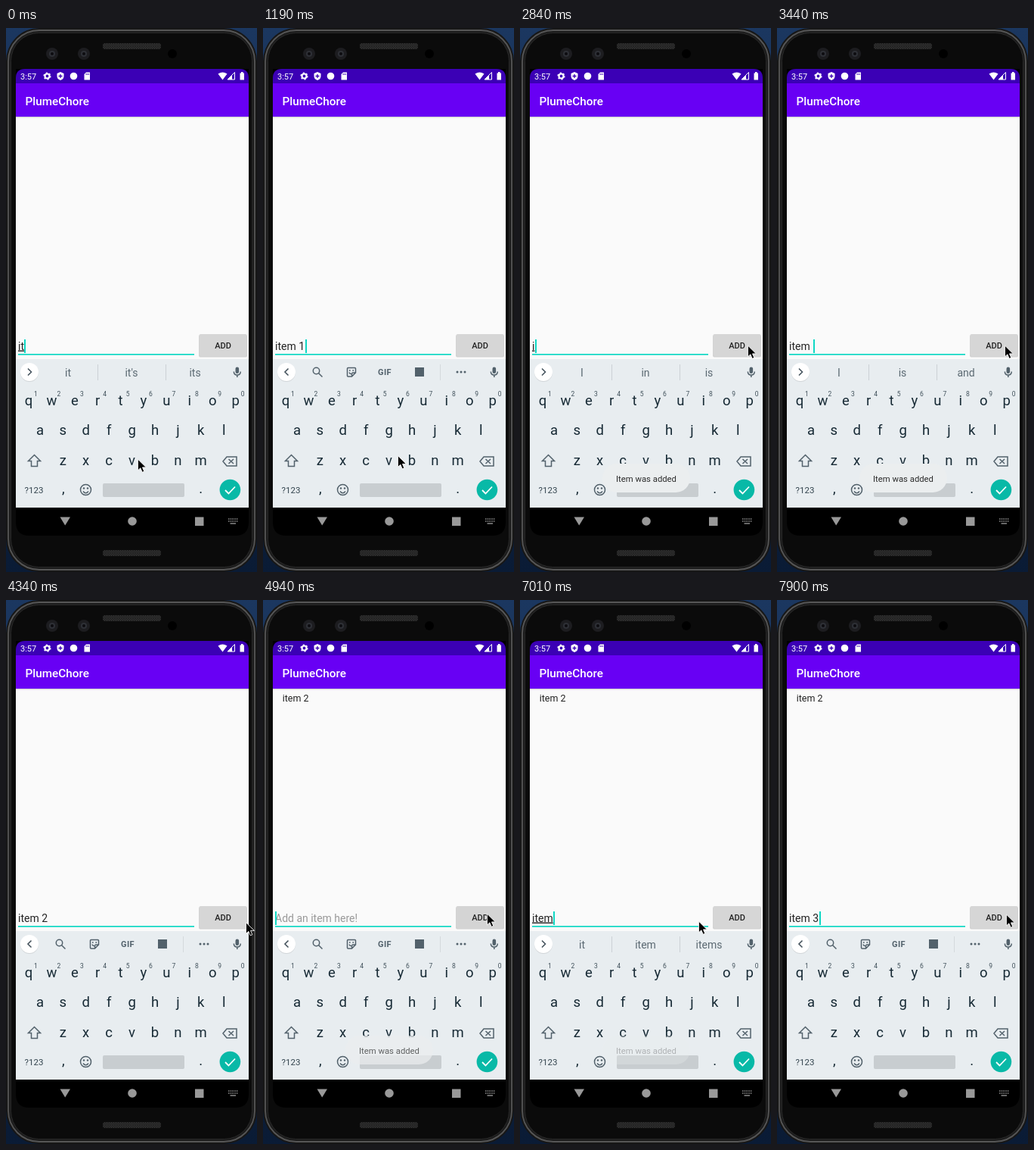
Animation, 332 px wide and 718 px high, one loop 8 s. Source, as an HTML page:

```html
<!DOCTYPE html>
<html lang="en">
<head>
<meta charset="utf-8">
<title>To-do demo</title>
<style>
  html, body { margin: 0; width: 100%; height: 100%; overflow: hidden; background: #14294a; }
  svg { display: block; width: 332px; height: 718px; font-family: Roboto, sans-serif; }
  text { white-space: pre; }
  .mid { text-anchor: middle; }
  .keys { font-size: 18.5px; fill: #172a35; }
  .nums { font-size: 8.5px; fill: #3f4f59; }
  .line { fill: none; stroke: #52616b; stroke-width: 1.5; }
  .solid { fill: #52616b; }
  .words { font-size: 14px; fill: #5b6972; }
</style>
</head>
<body>
<svg viewBox="0 0 332 718">
  <defs>
    <linearGradient id="desk" x2="0" y2="1">
      <stop offset="0" stop-color="#1b3760"/><stop offset="1" stop-color="#0a1b35"/>
    </linearGradient>
    <linearGradient id="shade" x2="0" y2="1">
      <stop offset="0" stop-opacity=".2"/><stop offset="1" stop-opacity="0"/>
    </linearGradient>
    <pattern id="mesh" width="3" height="3" patternUnits="userSpaceOnUse">
      <path d="M0 0H3V3H0Z" fill="#303030"/><path d="M0 0L3 3M3 0L0 3" stroke="#1c1c1c" stroke-width=".7"/>
    </pattern>
  </defs>

  <!-- Phone body -->
  <rect width="332" height="718" fill="url(#desk)"/>
  <rect width="332" height="718" rx="44" fill="#171717"/>
  <rect x="3" y="3" width="326" height="712" rx="41" fill="#1c1c1c" stroke="#565656" stroke-width="1.8"/>
  <rect x="6.5" y="6.5" width="319" height="705" rx="37" fill="#0b0b0b" stroke="#2a2a2a"/>
  <g fill="url(#mesh)">
    <rect x="128" y="20" width="77" height="8" rx="3"/>
    <rect x="128" y="689" width="77" height="8" rx="3"/>
  </g>
  <g fill="#1d1d20">
    <circle cx="61" cy="34" r="8"/><circle cx="103" cy="34" r="8"/>
    <g fill="#2e3036"><circle cx="61" cy="34" r="4"/><circle cx="103" cy="34" r="4"/></g>
    <g fill="#0c0c10"><circle cx="61" cy="34" r="2"/><circle cx="103" cy="34" r="2"/></g>
    <circle cx="220" cy="34" r="6" fill="#000"/>
  </g>

  <!-- Screen -->
  <path d="M13 54H321V652Q321 670 303 670H31Q13 670 13 652Z" fill="#000"/>
  <path d="M13 73V66Q13 54 25 54H309Q321 54 321 66V73Z" fill="#3b00b5"/>
  <rect x="13" y="73" width="308" height="44" fill="#6800f4"/>
  <rect x="13" y="117" width="308" height="320" fill="#fafafa"/>
  <rect x="13" y="117" width="308" height="2" fill="url(#shade)"/>
  <rect x="13" y="437" width="308" height="196" fill="#e8edf0"/>

  <g fill="#fff">
    <text x="19" y="67.5" font-size="11">3:57</text>
    <circle cx="54.5" cy="63.5" r="3" fill="none" stroke="#fff" stroke-width="2.2"/>
    <circle cx="54.5" cy="63.5" r="4.3" fill="none" stroke="#fff" stroke-width="1.6" stroke-dasharray="2 2.5"/>
    <path d="M72 58L76.5 60V63.5Q76.5 67.5 72 69Q67.5 67.5 67.5 63.5V60Z"/>
    <path d="M72 61V66M69.5 63.5H74.5" stroke="#3b00b5" stroke-width="1.3"/>
    <circle cx="89.5" cy="63.5" r="4.8"/>
    <path d="M103.5 61L106 58.5H111V68.5H103.5Z"/>
    <path d="M106 60V62M107.7 60V62M109.4 60V62" stroke="#3b00b5" stroke-width=".8"/>
    <path d="M280.5 60.5Q286.5 56.5 292.5 60.5L286.5 68.5Z"/>
    <path d="M302.5 58.5V68H293Z" fill="none" stroke="#fff"/>
    <path d="M299 62V68H293Z"/>
    <path d="M309.5 59.5H311V58H313.5V59.5H315V68.5H309.5Z"/>
    <text x="25.5" y="101.5" font-size="15.3" font-weight="500">PlumeChore</text>
  </g>

  <text id="row" x="25.7" y="134" font-size="12.5" fill="#222">item 2</text>

  <!-- Entry line -->
  <text id="hint" x="16" y="424.5" font-size="14" fill="#999">Add an item here!</text>
  <text id="entry" x="16" y="424.5" font-size="14" fill="#222"></text>
  <rect x="16" y="430" width="233" height="1.7" fill="#0fd8c4"/>
  <rect id="caret" y="411" width="2" height="18" fill="#0fd8c4"/>
  <rect x="255" y="405" width="64" height="29.5" rx="2" opacity=".16"/>
  <rect id="button" x="255.5" y="404" width="63" height="29" rx="2"/>
  <text class="mid" x="287" y="423" font-size="11" font-weight="500" fill="#222">ADD</text>

  <!-- Strip above the keys -->
  <circle cx="31" cy="455" r="12" opacity=".1"/>
  <circle cx="31" cy="454" r="12" fill="#fff"/>
  <path id="chevron" fill="none" stroke="#46545e" stroke-width="1.6"/>
  <g id="words" class="words mid">
    <path d="M121.5 444V465M211.5 444V465" stroke="#cbd1d5"/>
    <text x="82" y="459.5"></text><text x="166" y="459.5"></text><text x="250" y="459.5"></text>
  </g>
  <g id="tools">
    <g class="line">
      <circle cx="70.5" cy="452.5" r="4.2"/><path d="M73.5 455.5L78.5 460.5"/>
      <path d="M112.5 448.5H121.5Q122.5 448.5 122.5 449.5V455L117.5 460H112.5Q111.5 460 111.5 459V449.5Q111.5 448.5 112.5 448.5ZM122 455H118.5Q117.5 455 117.5 459.5M114 454.5Q115 457 117 456.5"/>
    </g>
    <g class="solid">
      <circle cx="114.8" cy="452" r=".9"/><circle cx="119.2" cy="452" r=".9"/>
      <text class="mid" x="161" y="458" font-size="11" font-weight="700" letter-spacing=".4">GIF</text>
      <rect x="201" y="448" width="12" height="12"/>
      <circle cx="257" cy="454" r="1.5"/><circle cx="262" cy="454" r="1.5"/><circle cx="267" cy="454" r="1.5"/>
    </g>
    <path d="M234.5 444V465" stroke="#d4d9dc"/>
  </g>
  <rect class="solid" x="303.5" y="447.5" width="4.6" height="8.5" rx="2.3"/>
  <path class="line" d="M301.3 453.5Q301.5 458 305.8 458T310.3 453.5M305.8 458V461"/>

  <!-- Keyboard -->
  <g id="keys" class="keys mid"></g>
  <g id="nums" class="nums mid"></g>
  <path class="line" d="M37.5 563.5L45.5 571.5H41.5V578.5H33.5V571.5H29.5Z"/>
  <path class="line" d="M292 566H305V578H292L287 572ZM294.5 569L301 575M301 569L294.5 575"/>
  <text class="mid" x="37" y="614" font-size="11.5" fill="#33444e">?123</text>
  <circle class="line" cx="105.5" cy="609.5" r="7"/>
  <path class="line" d="M102 611.5Q105.5 616 109 611.5"/>
  <circle class="solid" cx="103" cy="607.5" r="1.2"/><circle class="solid" cx="108" cy="607.5" r="1.2"/>
  <rect x="128" y="601" width="108" height="18" rx="2" fill="#c8cdd0"/>
  <circle cx="296.4" cy="609.5" r="13.8" fill="#08b9a7"/>
  <path d="M290 610L294.4 614.5L303 605.5" fill="none" stroke="#fff" stroke-width="1.8"/>

  <!-- Navigation bar -->
  <g fill="#999">
    <path d="M71.5 645.5H85L78.2 656.5Z"/>
    <circle cx="167" cy="651" r="5.8"/>
    <rect x="250" y="645.5" width="11.5" height="11.5"/>
    <path d="M294 648H306.500M294 651H306.500" stroke="#8a8a8a" stroke-width="1.6" stroke-dasharray="1.600 1.100"/>
    <path d="M296.5 654H304" stroke="#8a8a8a" stroke-width="1.5"/>
  </g>

  <g id="toast">
    <rect x="109" y="575" width="116" height="38" rx="19" fill="#ebeeef"/>
    <text class="mid" x="167" y="598.5" font-size="11.3" fill="#2b2b2b">Item was added</text>
  </g>

  <g id="pointer">
    <path d="M-.6 -.4V14.5L2.8 11.3L5.2 16.8L7.8 15.7L5.5 10.4H10.4Z" stroke="#fff" stroke-width=".9"/>
  </g>
</svg>
<script>
const LOOP = 8000;
const $ = id => document.getElementById(id);
const [hint, entry, caret, button, chevron, words, tools, toast, row, pointer] =
  ["hint", "entry", "caret", "button", "chevron", "words", "tools", "toast", "row", "pointer"].map($);
const wordSlots = words.querySelectorAll("text");

function addRow(group, letters, x, y) {
  [...letters].forEach((letter, i) => {
    const label = document.createElementNS("http://www.w3.org/2000/svg", "text");
    label.setAttribute("x", x + i * 30.4);
    label.setAttribute("y", y);
    label.textContent = letter;
    group.append(label);
  });
}
addRow($("keys"), "qwertyuiop", 30, 497.5);
addRow($("keys"), "asdfghjkl", 45, 537);
addRow($("keys"), "zxcvbnm", 75.3, 577);
addRow($("keys"), ",", 75.8, 614);
addRow($("keys"), ".", 257.8, 614);
addRow($("nums"), "1234567890", 39.5, 485.5);

const typeItem = start => ["i", "it", "ite", "item", "item "].map((s, i) => [start + i * 146, s]);

// Each track lists [time, value]; a value holds until the next time.
const typed = [
  [0, "it"], [140, "ite"], [290, "item"], [1040, "item "], [1190, "item 1"], [2090, ""],
  ...typeItem(2840), [3890, "item 2"], [4790, ""],
  ...typeItem(6570), [7610, "item 3"]
];
const caretOn = [
  [0, 1], [740, 0], [1040, 1], [1640, 0], [2090, 1], [4340, 0], [4940, 1],
  [5540, 0], [5840, 1], [6280, 0], [6570, 1]
];
const buttonGrey = [
  [0, 214], [1940, 208], [2090, 200], [2240, 207], [2390, 214],
  [4790, 203], [4940, 212], [5090, 214]
];
const toastAlpha = [
  [0, 0], [2090, .58], [2240, .9], [2390, 1], [3890, .75], [4040, .3], [4190, 0],
  [4940, .72], [5090, .92], [5240, 1], [6870, .7], [7010, .3], [7160, 0]
];
const rowAlpha = [[0, 0], [4790, .35], [4940, 1]];
const pointerAt = [
  [0, "175 569.5"], [1040, "177 567"], [1190, "179 565"], [1340, "205 530"], [1490, "255 455"],
  [1640, "305 385"], [1790, "321 364"], [1940, "302 419.5"],
  [4040, "311 425"], [4190, "321 430"], [4340, "318 426"], [4490, "308 420"], [4640, "299 416"],
  [4790, "297 414.5"], [5690, "280 417"], [5840, "252 422"], [5980, "237 424.5"],
  [7750, "275 421"], [7900, "304 415.5"]
];
const suggestions = {
  "i": ["I", "in", "is"],
  "it": ["it", "it's", "its"],
  "ite": ["ite", "item", "items"],
  "item": ["it", "item", "items"],
  "item ": ["I", "is", "and"]
};

const at = (track, t) => track.findLast(([time]) => time <= t)[1];
const show = (node, on) => node.setAttribute("visibility", on ? "visible" : "hidden");
const ruler = document.createElement("canvas").getContext("2d");
ruler.font = "14px Roboto, sans-serif";

function draw(t) {
  const text = at(typed, t);
  const list = suggestions[text];
  entry.textContent = text;
  entry.style.textDecoration = /^[a-z]+$/.test(text) ? "underline" : "none";
  show(hint, !text);
  caret.setAttribute("x", Math.ceil(16 + ruler.measureText(text).width));
  show(caret, at(caretOn, t));

  show(words, list);
  show(tools, !list);
  if (list) list.forEach((word, i) => wordSlots[i].textContent = word);
  chevron.setAttribute("d", list ? "M29 449.5L33.5 454L29 458.5" : "M33.5 449.5L29 454L33.5 458.5");

  const grey = at(buttonGrey, t);
  button.setAttribute("fill", `rgb(${grey},${grey},${grey})`);
  toast.setAttribute("opacity", at(toastAlpha, t));
  row.setAttribute("opacity", at(rowAlpha, t));
  pointer.setAttribute("transform", `translate(${at(pointerAt, t)})`);
}

const start = performance.now();
function tick() {
  draw((performance.now() - start) % LOOP);
  requestAnimationFrame(tick);
}
tick();
</script>
</body>
</html>
```
